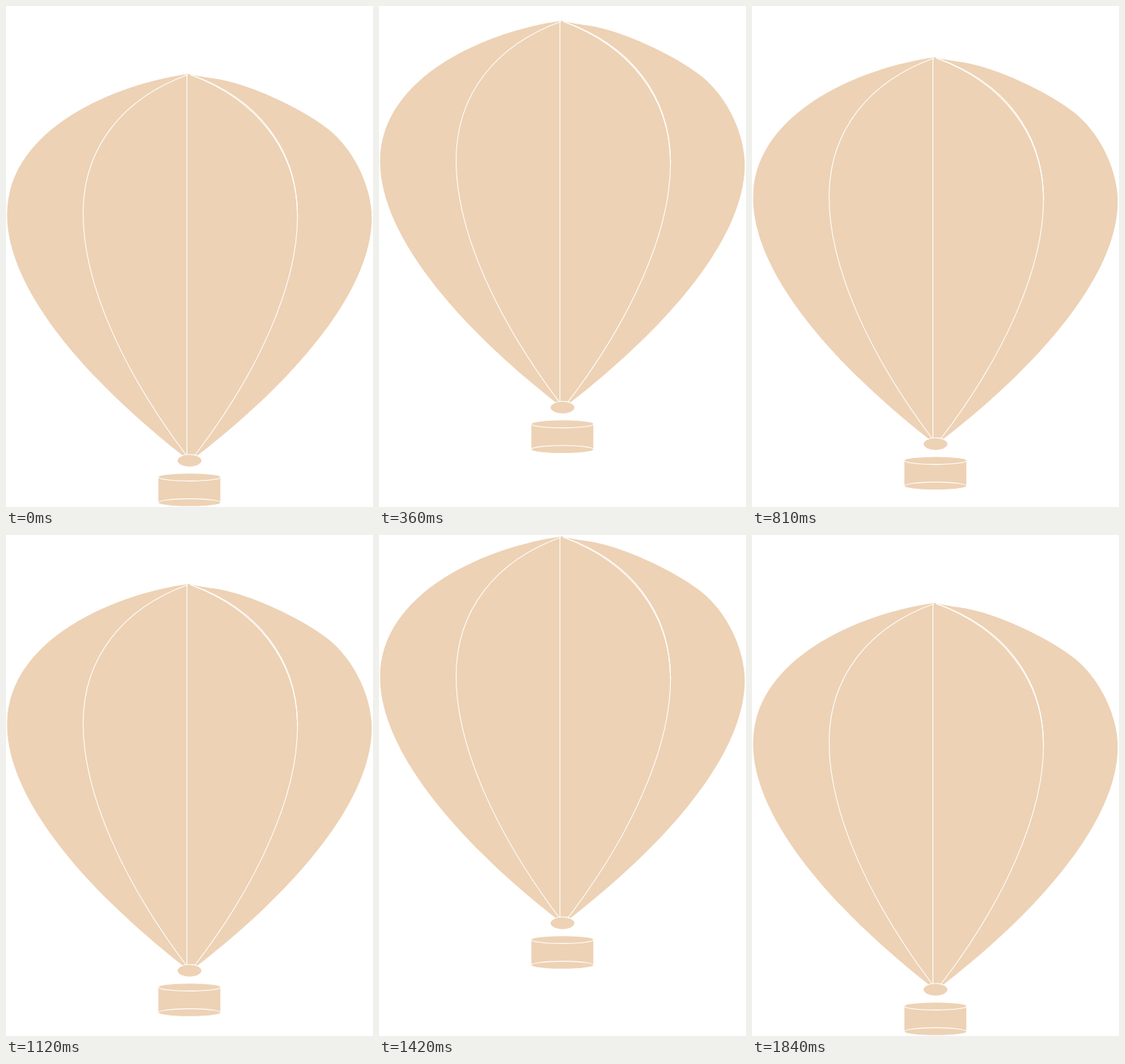
Recreate the animation shown at these times as an HTML page. Size 502 by 686 pixels, loop 1.93 s.

```html
<!DOCTYPE html>
<html lang="en">
<head>
<meta charset="utf-8">
<title>Balloon</title>
<style>
  html, body { margin: 0; width: 100%; height: 100%; overflow: hidden; background: #fff; }
  svg { display: block; width: 100%; height: 100%; }
  .skin { fill: #edd2b5; }
  .line { stroke: #fff; stroke-width: 1.1; }
  .seam { fill: none; }
</style>
</head>
<body>
<svg viewBox="0 0 502 686">
  <g id="balloon">
    <path class="skin" d="M250 93 C150 106.500 1.500 168 1.500 286 C1.500 380 95 499.500 241 615
      L251 622 L260 617 C407 503 500.300 384 500.300 290 C500.300 250 478 198 440 168
      C400 137 333 108.500 295 101 C285 99 275 98 258 95 Z"/>
    <g class="line seam">
      <path d="M249 94 C160 126 105.500 193.500 105.500 284 C105.500 380 160 500 246.500 615"/>
      <path d="M252 94 C342 127.500 398.700 197.500 398.700 288 C398.700 382 345 502 258.500 615"/>
      <path d="M252 94 C345 126.500 398.700 196.500 398.700 288"/>
      <path d="M247.500 94 V615"/>
    </g>
    <ellipse class="skin line" cx="251" cy="622.600" rx="16.800" ry="8.600"/>
    <path class="skin" d="M208.400 645 H293.200 V680 H208.400 Z"/>
    <ellipse class="skin line" cx="251" cy="645" rx="43" ry="5.400"/>
    <ellipse class="skin line" cx="251" cy="680" rx="43" ry="5.400"/>
  </g>
</svg>
<script>
  const LOOP = 1930, STEP = 30, RISE = 91;

  // Each move: time of its first step, number of steps, direction
  const moves = [
    { at: 30, steps: 15, dir: -1 },
    { at: 570, steps: 12, dir: 1 },
    { at: 1030, steps: 14, dir: -1 },
    { at: 1540, steps: 11, dir: 1 }
  ];

  const balloon = document.getElementById("balloon");

  function offsetAt(time) {
    return moves.reduce((y, { at, steps, dir }) => {
      const done = Math.floor((time - at) / STEP + 0.001) + 1;
      return y + dir * RISE * Math.min(Math.max(done, 0), steps) / steps;
    }, 0);
  }

  let start;
  function draw(now) {
    start ??= now;
    const y = offsetAt((now - start) % LOOP);
    balloon.setAttribute("transform", `translate(0 ${y.toFixed(3)})`);
    requestAnimationFrame(draw);
  }
  requestAnimationFrame(draw);
</script>
</body>
</html>
```
